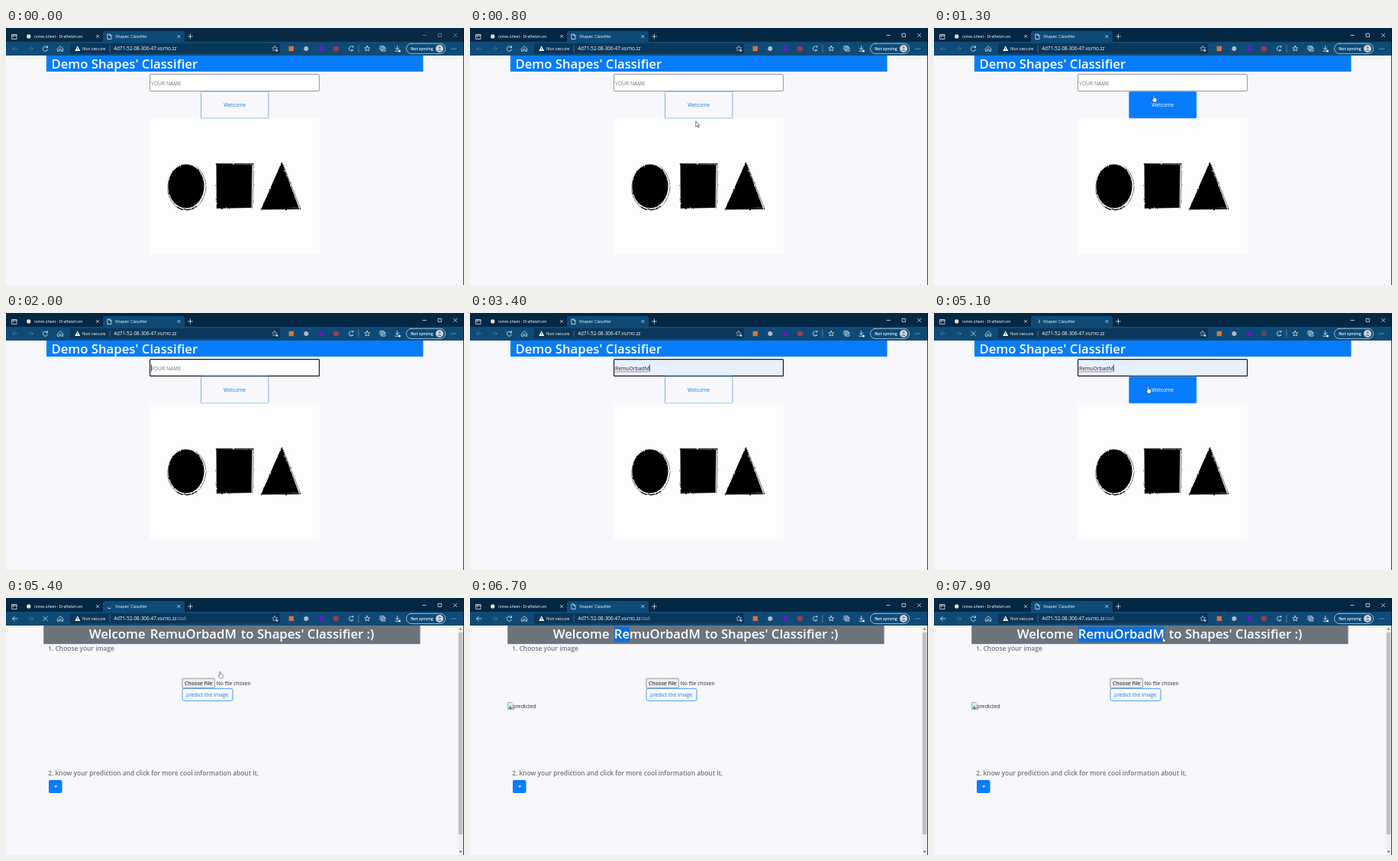
An HTML page for the animation above (8 s loop, 600 px wide and 336 px high).

```html
<!DOCTYPE html>
<html lang="en">
<head>
<meta charset="utf-8">
<title>Shapes' Classifier</title>
<style>
html, body { margin: 0; width: 100%; height: 100%; overflow: hidden; background: #f8f8fc; }
svg { display: block; width: 100%; height: 100%; }
text { font-family: "Open Sans", "Noto Sans", sans-serif; font-size: 6.8px; white-space: pre; }
.head { font-size: 16.7px; font-weight: 600; fill: #fff; }
.step { font-size: 8.4px; font-weight: 600; fill: #6c757d; }
.tab { font-size: 5.2px; fill: #fff; }
.addr { font-size: 6.35px; fill: #fff; }
.ink { fill: #212529; }
.line { fill: none; stroke: #fff; stroke-width: .7; stroke-linecap: round; stroke-linejoin: round; }
.dry { fill: none; stroke: #555; stroke-width: .8; }
</style>
</head>
<body>
<svg viewBox="0 0 600 336" preserveAspectRatio="none">
  <filter id="brush" x="-5%" y="-5%" width="110%" height="110%">
    <feTurbulence type="fractalNoise" baseFrequency=".22" numOctaves="2" seed="4"/>
    <feDisplacementMap in="SourceGraphic" scale="2.2" xChannelSelector="R" yChannelSelector="G"/>
  </filter>
  <rect width="600" height="336" fill="#f8f8fc"/>

  <g id="formPage">
    <rect x="53" y="36" width="493.5" height="21" fill="#077cfc"/>
    <text class="head" x="59.5" y="53">Demo Shapes' Classifier</text>
    <rect id="field" x="188.6" y="60.6" width="221.8" height="21.8" rx="1"/>
    <text id="hint" x="190" y="74.5" fill="#757575">YOUR NAME</text>
    <text id="typed" class="ink" x="190" y="74.5"></text>
    <path id="squiggle" fill="none" stroke="#e0302c" stroke-width=".6"/>
    <rect id="caret" y="67.5" width=".8" height="9" fill="#111"/>
    <rect id="button" x="255.5" y="83" width="88.4" height="35" rx="1.5" stroke="#5aa5e6" stroke-width=".8"/>
    <text id="buttonText" x="285" y="103">Welcome</text>

    <rect x="188.5" y="118.5" width="222" height="177.5" fill="#fefdfe"/>
    <g filter="url(#brush)">
      <ellipse cx="236" cy="206.8" rx="23.6" ry="28.6"/>
      <path class="dry" d="M249 181Q262 191 262 209Q258 236 238 238Q218 238 212 215Q211 205 214 196"/>
      <path d="M224 234Q236 242 250 233" fill="none" stroke="#111" stroke-width="1.3"/>
      <path d="M275.5 178L322.5 179L321.5 235L275.8 236Z"/>
      <path class="dry" d="M275 177.6H324.4L322.8 236"/>
      <path d="M274.8 177.8H324" fill="none" stroke="#000" stroke-width="1.2"/>
      <path d="M361.3 175L383.8 235.6L334.3 236.8Z"/>
      <path class="dry" d="M364 181L386 236.5"/>
      <path d="M333.8 236.8L386 236.4" fill="none" stroke="#000" stroke-width="1.2"/>
    </g>
  </g>

  <g id="resultPage">
    <rect x="49.2" y="36" width="493.4" height="24.2" fill="#6c757d"/>
    <rect id="mark" x="188.8" y="37.5" height="20" fill="#0b6fdc"/>
    <text class="head" x="108.8" y="53">Welcome</text>
    <text class="head" id="who" x="188.8" y="53">RemuOrbadM</text>
    <text class="head" x="307.8" y="53">to Shapes' Classifier :)</text>
    <text class="step" x="55.3" y="69">1. Choose your image</text>
    <rect x="231" y="105.2" width="42.4" height="12.4" rx="1" fill="#efefef" stroke="#767676" stroke-width=".7"/>
    <text x="234" y="114">Choose File</text>
    <text class="ink" x="275.7" y="114">No file chosen</text>
    <rect x="231" y="118.4" width="66" height="16" rx="2" fill="none" stroke="#2087ff" stroke-width=".8"/>
    <text x="236" y="129" fill="#1780fb">predict the image</text>
    <g id="broken">
      <path d="M49.5 136.5H54L56 138.5V145.5H49.5Z" fill="#dfe8f2" stroke="#8b9097" stroke-width=".6"/>
      <path d="M50 145L52.5 141L56 145Z" fill="#4ea551"/>
      <text class="ink" x="56.3" y="143.7">predicted</text>
    </g>
    <text class="step" x="55.3" y="232.3">2. know your prediction and click for more cool information about it.</text>
    <rect x="56" y="238" width="17.5" height="17" rx="2" fill="#077cfc"/>
    <path d="M63 245.6H67.4L65.2 247.8Z" fill="#fff"/>
    <rect x="592" y="36" width="8" height="300" fill="#f1f1f1"/>
    <rect x="592.8" y="45" width="5.6" height="264" fill="#c1c1c1"/>
    <path d="M593.6 41.5H597.4L595.5 39.3ZM593.6 330.8H597.4L595.5 333Z" fill="#505050"/>
  </g>

  <g id="browser">
    <rect id="strip" width="600" height="19"/>
    <path d="M127 18.5V6.5Q127 4 129.5 4H231.5Q234 4 234 6.5V18.5Z" fill="#0f4a76"/>
    <rect y="18" width="600" height="18" fill="#0f4a76"/>
    <rect x="84" y="20" width="275" height="13.6" rx="2" fill="#093659"/>

    <g class="line">
      <path d="M8 8.5H14V14.5H8ZM8 10H14M10 10V12"/>
      <path id="docIcon" d="M133.3 8H136L138 10V14.5H133.3ZM136 8V10H138"/>
      <path id="spinner" d="M135.5 8.3A2.8 2.8 0 0 1 138.3 11.1"/>
      <path d="M118.5 9.4L121.7 12.6M121.7 9.4L118.5 12.6M224.8 9.4L228 12.6M228 9.4L224.8 12.6M238.4 11H244.4M241.4 8V14"/>
      <path id="winKeys" d="M546 9.5H550.2M566.4 7.4H570.4V11.4H566.4ZM586.5 7.4L590.7 11.6M590.7 7.4L586.5 11.6"/>
      <path id="back" d="M15 27H8.5M11.5 24L8.5 27L11.5 30"/>
      <path d="M29 27H35.5M32.5 24L35.5 27L32.5 30" opacity=".3"/>
      <path id="reload" d="M54.3 25.5A3.2 3.2 0 1 0 54.6 28M54.5 23.5V25.7H52.2"/>
      <path id="stop" d="M48.7 24.2L54.3 29.8M54.3 24.2L48.7 29.8"/>
      <path d="M67.8 26.8L71.2 23.8L74.6 26.8V30.3H72.3V27.8H70.1V30.3H67.8Z"/>
      <path d="M136 23V31M461.8 22V32" opacity=".55" stroke-width=".5"/>
      <path opacity=".7" d="M352 23.4L353 25.7L355.4 26L353.6 27.6L354.1 30L352 28.7L349.9 30L350.4 27.6L348.6 26L351 25.7Z"/>
      <path d="M473.2 23.4L474.2 25.7L476.6 26L474.8 27.6L475.3 30L473.2 28.7L471.1 30L471.6 27.6L469.8 26L472.2 25.7Z"/>
      <path d="M454.6 25A3 3 0 1 0 454.6 29M454.6 25V23.4M454.6 29H452.3"/>
      <path d="M490.3 23.6H495V28.3H490.3ZM492 28.3V30.2H496.8V25.3H495M492.6 24.8V27M491.5 25.9H493.7"/>
      <path d="M512.6 23.3V28.3M510.3 26.2L512.6 28.3L514.9 26.2M509.7 30.3H515"/>
      <rect x="524.5" y="20.3" width="51" height="13.3" rx="6.6" stroke-width=".6"/>
    </g>
    <path d="M93.7 23.3L97.2 30H90.2Z" fill="#fff"/>
    <path d="M93.7 25.5V28M93.7 28.7V29.3" stroke="#093659" stroke-width=".8"/>
    <circle cx="355" cy="29.5" r="1.4" fill="#b4c5d4"/>
    <circle cx="515.4" cy="30" r="1.6" fill="#e9eef2"/>
    <circle cx="29.7" cy="11" r="2.7" fill="#e5d9cc"/>
    <rect x="370.5" y="23.8" width="6.4" height="6.4" fill="#d8713c"/>
    <circle cx="393.2" cy="27" r="3" fill="#aebbc7"/>
    <circle cx="413" cy="27" r="3.4" fill="#5a22b4"/>
    <rect id="badge" x="429.2" y="23.9" width="6.2" height="6.2"/>
    <circle cx="568" cy="27" r="5" fill="#d4d8dc"/>
    <circle cx="568" cy="25.5" r="1.7" fill="#8b939b"/>
    <path d="M564.8 30.2A3.4 3.4 0 0 1 571.2 30.2Z" fill="#8b939b"/>
    <g fill="#fff"><circle cx="584" cy="27" r=".6"/><circle cx="586.5" cy="27" r=".6"/><circle cx="589" cy="27" r=".6"/></g>

    <text class="tab" x="37" y="13">notes.sheet - Draftelarium</text>
    <text class="tab" x="143.3" y="13">Shapes' Classifier</text>
    <text x="100" y="29.2" fill="#fff" style="font-size:6px">Not secure</text>
    <text class="addr" x="141.3" y="29.2">4d71-52-08-306-47.vurno.zz<tspan id="path" fill="#a9bccb">/out</tspan></text>
    <text class="tab" x="530.3" y="28.9" font-weight="600">Not syncing</text>
    <rect x="599.2" width=".8" height="336" fill="#0a1622"/>
  </g>

  <path id="arrow" d="M0 0V7.4L1.7 5.9L2.8 8.3L4 7.8L2.9 5.5H5.1Z" fill="#fff" stroke="#222" stroke-width=".6"/>
  <path id="hand" d="M1.2 .6Q2 -.3 2.7 .7V3.6L5.3 4.1Q6.1 4.4 6 5.4L5.4 9H1.8L-.5 5.8Q-.4 4.7 .7 5.2L1.2 5.7Z" fill="#fff" stroke="#333" stroke-width=".55"/>
</svg>

<script>
const LOOP = 8000, NAME = "RemuOrbadM";
const ui = {};
document.querySelectorAll("[id]").forEach(node => ui[node.id] = node);

const set = (node, attrs) => {
  for (const key in attrs) node.setAttribute(key, attrs[key]);
};
const show = (node, on) => set(node, { visibility: on ? "inherit" : "hidden" });
const within = (t, a, b) => t >= a && t < b;
const ramp = (t, a, b) => Math.min(1, Math.max(0, (t - a) / (b - a)));
const mix = (a, b, k) => a + (b - a) * k;
const blend = (a, b, k) => `rgb(${a.map((v, i) => Math.round(mix(v, b[i], k)))})`;

// Pointer keys: time, x, y
const enter = [[600, 312, 168], [800, 295.8, 122], [1050, 291, 104], [1300, 286, 88], [1500, 283, 76]];
const toButton = [[3500, 272, 82], [3800, 278.5, 96], [5500, 278.5, 96]];
const toHeading = [[5500, 279, 95], [6000, 206, 60]];

function along(keys, t) {
  let i = 0;
  while (i < keys.length - 2 && t >= keys[i + 1][0]) i++;
  const [a, b] = [keys[i], keys[i + 1]];
  const k = ramp(t, a[0], b[0]);
  return [mix(a[1], b[1], k), mix(a[2], b[2], k)];
}

function pointer(t) {
  let shape = null, pos = [0, 0];
  if (within(t, 600, 1400)) {
    pos = along(enter, t);
    shape = pos[1] < 118 ? "hand" : "arrow";
  } else if (within(t, 3500, 5500)) {
    pos = along(toButton, t);
    shape = "hand";
  } else if (within(t, 5500, 6000)) {
    pos = along(toHeading, t);
    shape = "arrow";
  } else if (t >= 7900) {
    pos = [299.5, 51.2];
    shape = "arrow";
  }
  for (const id of ["arrow", "hand"]) {
    show(ui[id], shape === id);
    set(ui[id], { transform: `translate(${pos})` });
  }
}

function form(t) {
  const focus = t >= 2000, filled = t >= 2800;
  const count = filled ? NAME.length : t < 2300 ? 0 : Math.min(3, Math.floor((t - 2300) / 100) + 1);
  set(ui.field, {
    fill: filled ? "#e8f0fe" : "#fff",
    stroke: focus ? "#15171b" : "#767676",
    "stroke-width": focus ? 1.15 : .8
  });
  show(ui.hint, !count);
  ui.typed.textContent = NAME.slice(0, count);
  const width = count ? ui.typed.getComputedTextLength() : 0;
  set(ui.caret, { x: 190 + width });
  show(ui.caret, focus);

  let wave = "M190 76.6";
  for (let x = 1; x < width; x++) wave += `L${190 + x} ${x % 2 ? 77.3 : 76.2}`;
  set(ui.squiggle, { d: wave });
  show(ui.squiggle, t >= 3000);

  const hover = ramp(t, 850, 1000) * (1 - ramp(t, 1350, 1500)) + ramp(t, 3600, 3750);
  set(ui.button, { fill: blend([248, 248, 252], [7, 124, 252], hover) });
  set(ui.buttonText, { fill: blend([23, 128, 235], [255, 255, 255], hover) });
}

function result(t) {
  const count = t < 6700 ? 0 : Math.min(NAME.length, Math.floor((t - 6700) / 100) + 2);
  set(ui.mark, { width: count ? ui.who.getSubStringLength(0, count) : 0 });
  show(ui.broken, t >= 6000);
}

function chrome(t) {
  const active = t >= 600, loading = within(t, 4400, 6100), moved = t >= 5200;
  set(ui.strip, { fill: active ? "#042744" : "#092a45" });
  set(ui.winKeys, { opacity: active ? 1 : .5 });
  set(ui.back, { opacity: moved ? 1 : .3 });
  show(ui.reload, !loading);
  show(ui.stop, loading);
  show(ui.docIcon, !loading);
  show(ui.spinner, loading);
  set(ui.spinner, { transform: `rotate(${t * .36} 135.5 11.1)` });
  show(ui.path, moved);
  set(ui.badge, { fill: within(t, 4300, 5200) ? "#5d4a63" : "#a03a50" });
}

function draw(t) {
  const moved = t >= 5200;
  show(ui.formPage, !moved);
  show(ui.resultPage, moved);
  if (moved) result(t); else form(t);
  chrome(t);
  pointer(t);
}

const start = performance.now();
function tick() {
  draw((performance.now() - start) % LOOP);
  requestAnimationFrame(tick);
}
tick();
</script>
</body>
</html>
```
